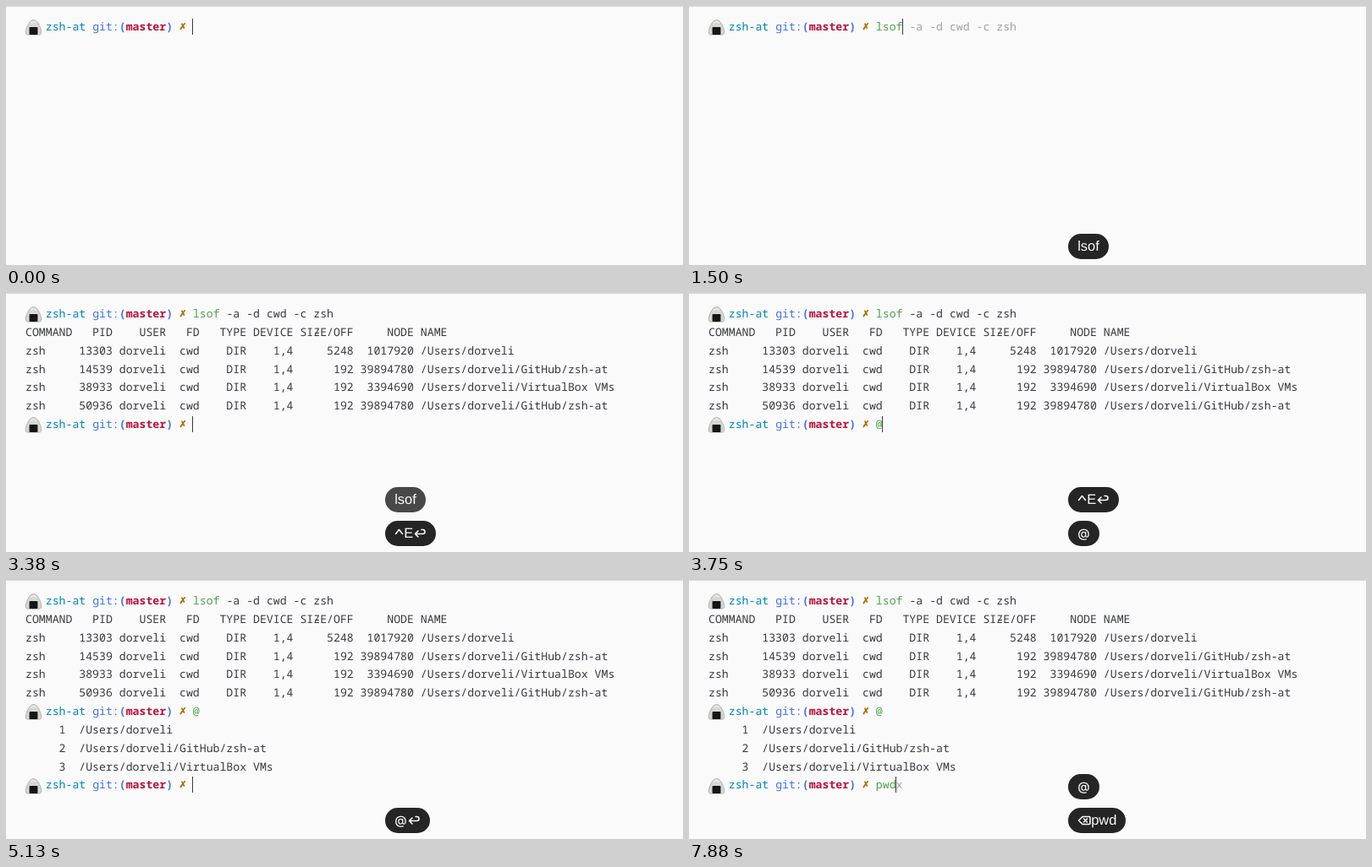
These frames come from a looping animation (800x307 px, 8000 ms). An HTML page:

```html
<!DOCTYPE html>
<html lang="en">
<head>
<meta charset="utf-8">
<title>Terminal session</title>
<style>
  html, body { margin: 0; width: 100%; height: 100%; overflow: hidden; background: #fafafa; }
  #stage {
    position: relative; width: 800px; height: 307px; overflow: hidden;
    background: #fafafa; border-top: 1px solid #dcdcdc; box-sizing: border-box;
    font: 13.19px/21.83px "Noto Sans Mono", "DejaVu Sans Mono", monospace;
    text-rendering: geometricPrecision; font-variant-ligatures: none; color: #383a42;
  }
  .row { position: absolute; left: 23px; height: 21.83px; }
  .row span { position: absolute; top: 0; white-space: pre; }
  .row svg { position: absolute; left: -0.7px; top: 1.3px; }
  .dir { color: #0184bc; font-weight: 500; }
  .git { color: #3f72e6; font-weight: 500; }
  .branch { color: #b8123c; font-weight: bold; }
  .dirty {
    color: #a86c00; font: bold 13px/21.83px "DejaVu Sans Mono", monospace;
    -webkit-text-stroke: 0.5px #a86c00;
  }
  .ok { color: #50a14f; }
  .bad { color: #ca1243; font-weight: bold; }
  .hint { color: #a0a1a7; }
  #bar { position: absolute; width: 1px; height: 19px; background: #383a42; }
  #slash { position: absolute; left: 364.8px; top: 45.5px; width: 5px; height: 1px; background: #383a42; }
  .pill {
    position: absolute; left: 448.2px; height: 30px; padding: 0 11px;
    border-radius: 15px; background: #252525; color: #fafafa; display: flex; align-items: center;
    font: 16.5px/30px "Liberation Sans", Arial, sans-serif; white-space: pre;
  }
  .pill .at { font: 500 14.6px/30px Inter, sans-serif; }
  .pill svg { fill: none; stroke: #fafafa; stroke-width: 1.6; stroke-linecap: round; stroke-linejoin: round; }
</style>
</head>
<body>
<div id="stage"></div>
<script>
const LOOP = 8000, CELL = 7.914, PITCH = 21.83, TOP = 13.1;
const stage = document.getElementById('stage');

const icon = `<svg width="21" height="21" viewBox="0 0 20 20">
  <path d="M10 1.5C13 1.5 15 4 17 8.5C19 13 20 18.2 16.5 18.2H3.5C0 18.2 1 13 3 8.5C5 4 7 1.5 10 1.5Z" fill="#d6d6d4" stroke="#a9a9a6" stroke-width=".8"/>
  <path d="M7 5Q10 2 13 5" fill="none" stroke="#ededeb" stroke-width="1.5"/>
  <rect x="5.3" y="9.6" width="9.4" height="8.4" rx=".8" fill="#161616"/></svg>`;

const span = (col, cls, text) =>
  `<span class="${cls}" style="left:${col * CELL}px">${text}</span>`;
const prompt = icon + span(3, 'dir', 'zsh-at') + span(10, 'git', 'git:<b>(</b>') +
  span(15, 'branch', 'master') + span(21, 'git', '<b>)</b>') + span(23, 'dirty', '✗');

function add(cls, html) {
  const el = document.createElement('div');
  el.className = cls;
  el.innerHTML = html;
  stage.append(el);
  return el;
}
function row(n, html) {
  const el = add('row', html);
  el.style.top = TOP + n * PITCH + 'px';
  return el;
}
const plain = text => span(0, '', text);

// Terminal contents, with the time each block is printed
const home = '/Users/dorveli';
const proc = (pid, size, node, path) =>
  `zsh     ${pid} dorveli  cwd    DIR    1,4 ${size.padStart(8)} ${node.padStart(8)} ${home}${path}`;
const listing = [
  'COMMAND   PID    USER   FD   TYPE DEVICE SIZE/OFF     NODE NAME',
  proc('13303', '5248', '1017920', ''),
  proc('14539', '192', '39894780', '/GitHub/zsh-at'),
  proc('38933', '192', '3394690', '/VirtualBox VMs'),
  proc('50936', '192', '39894780', '/GitHub/zsh-at')
].map((s, i) => row(i + 1, plain(s)));
const slash = add('', '');
slash.id = 'slash';
const places = ['', '/GitHub/zsh-at', '/VirtualBox VMs']
  .map((p, i) => row(i + 7, plain(`     ${i + 1}  ${home}${p}`)));
row(0, prompt);
const blocks = [
  [2500, [...listing, slash, row(6, prompt)]],
  [4000, [...places, row(10, prompt)]]
];

// Typed commands: [time, command, arguments, suggestion, class]
const args = ' -a -d cwd -c zsh';
const inputs = [
  { n: 0, keys: [[1000, 'l', '', 'sof' + args], [1130, 'ls', '', 'of' + args],
    [1250, 'lso', '', 'f' + args, 'bad'], [1500, 'lsof', '', args], [2000, 'lsof', args, '']] },
  { n: 6, keys: [[3750, '@', '', '']] },
  { n: 10, keys: [[6380, '@', '', ''], [7380, '', '', ''], [7500, 'p', '', 'wdx', 'bad'],
    [7630, 'pw', '', 'dx', 'bad'], [7750, 'pwd', '', 'x']] }
].map(i => ({ ...i, el: row(i.n, '') }));

// Key caps: [time, html]; a pill moves up when the next one starts and fades when idle
const FADE = 300;
const glyph = (w, d) => `<svg width="${w}" height="16" viewBox="0 0 ${w} 16"><path d="${d}"/></svg>`;
const ret = glyph(16, 'M6 5L2.5 8.5L6 12M2.5 8.5H11.5Q14 8.5 14 6T11.5 3.5H10');
const ctrl = glyph(11, 'M1.5 8.5L5.5 3.5L9.5 8.5');
const del = glyph(16, 'M6 3.5H14Q15 3.5 15 4.5V11.5Q15 12.5 14 12.5H6L1.5 8ZM7.5 6L11.5 10M11.5 6L7.5 10');
const at = '<span class="at">@</span>';
const pills = [
  { up: 2000, fade: 3330, keys: [[1000, 'l'], [1130, 'ls'], [1250, 'lso'], [1500, 'lsof']] },
  { up: 3750, fade: 4030, keys: [[2000, ctrl + 'E'], [2250, ctrl + 'E' + ret]] },
  { up: 6380, fade: 5820, keys: [[3750, at], [4000, at + ret]] },
  { up: 7380, fade: LOOP, keys: [[6380, at]] },
  { up: LOOP, fade: LOOP,
    keys: [[7380, del], [7500, del + 'p'], [7630, del + 'pw'], [7750, del + 'pwd']] }
].map(p => ({ ...p, el: add('pill', '') }));

const bar = add('', '');
bar.id = 'bar';
// Caret: [time, column, row]
const caret = [[0, 25, 0], [1000, 26, 0], [1130, 27, 0], [1250, 28, 0], [1500, 29, 0],
  [2000, 46, 0], [2250, 0, 1], [2500, 25, 6], [3750, 26, 6], [4000, 25, 10],
  [6380, 26, 10], [7380, 25, 10], [7500, 26, 10], [7630, 27, 10], [7750, 28, 10]];
const blinks = [1750, 2880, 4880, 5880, 6880];

const last = (list, t) => list.findLast(k => k[0] <= t);
const show = (el, on) => { el.style.visibility = on ? 'visible' : 'hidden'; };
function fill(el, html) {
  if (el.shown !== html) el.innerHTML = el.shown = html;
}

function draw(t) {
  for (const [time, els] of blocks) els.forEach(el => show(el, t >= time));

  for (const { keys, el } of inputs) {
    const k = last(keys, t);
    if (!k) { fill(el, ''); continue; }
    const [, cmd, arg, hint, cls = 'ok'] = k;
    const end = 25 + cmd.length;
    fill(el, span(25, cls, cmd) + span(end, '', arg) + span(end + arg.length, 'hint', hint));
  }

  for (const { keys, up, fade, el } of pills) {
    const k = last(keys, t);
    show(el, k && t < fade + FADE);
    if (!k) continue;
    fill(el, k[1]);
    el.style.top = (t >= up ? 229 : 268.5) + 'px';
    el.style.opacity = Math.min(1, Math.max(0, 1 - (t - fade) / FADE));
  }

  const [, col, line] = last(caret, t);
  bar.style.left = Math.round(23 + col * CELL - 0.4) + 'px';
  bar.style.top = Math.round(TOP + line * PITCH + 1) + 'px';
  show(bar, !blinks.some(b => t >= b && t < b + 250));
}

const start = performance.now();
function tick(now) {
  draw(Math.max(0, now - start) % LOOP);
  requestAnimationFrame(tick);
}
draw(0);
requestAnimationFrame(tick);
</script>
</body>
</html>
```
